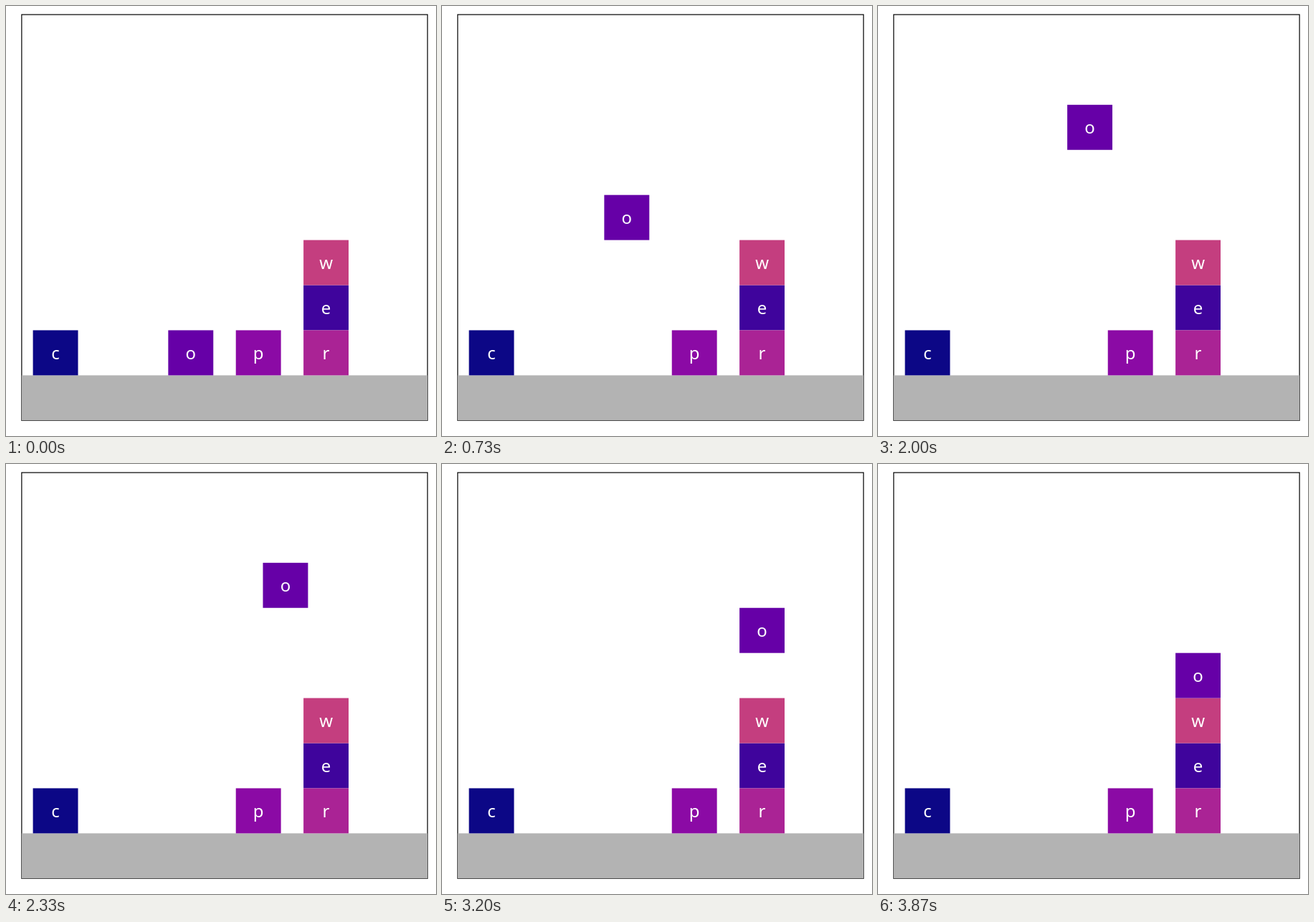
Recreate the animation shown at these times as an HTML page. Size 600x600 px, loop 4870 ms.

```html
<!DOCTYPE html>
<html lang="en">
<head>
<meta charset="utf-8">
<title>Stacking blocks</title>
<style>
  html, body { margin: 0; width: 100%; height: 100%; overflow: hidden; background: #fff; }
  svg { display: block; width: 100%; height: 100%; }
  text { font: 24px "Noto Sans", "Open Sans", sans-serif; fill: #fff; text-anchor: middle; }
</style>
</head>
<body>
<svg id="stage" viewBox="0 0 600 600"></svg>
<script>
const LOOP = 4870;
const UNIT = 62.92;
const LEFT = 21.87, TOP = 12, FLOOR = TOP + 8 * UNIT;
const stage = document.getElementById("stage");

function add(parent, tag, attrs) {
  const el = document.createElementNS("http://www.w3.org/2000/svg", tag);
  for (const key in attrs) el.setAttribute(key, attrs[key]);
  return parent.appendChild(el);
}

function place(block, column, level) {
  const x = LEFT + UNIT * (0.25 + 1.5 * column);
  const y = FLOOR - UNIT * (level + 1);
  block.setAttribute("transform", `translate(${x} ${y})`);
}

function addBlock(letter, fill, column, level) {
  const block = add(stage, "g", {});
  add(block, "rect", { width: UNIT, height: UNIT, fill });
  add(block, "text", { x: UNIT / 2, y: 40.6 }).textContent = letter;
  place(block, column, level);
  return block;
}

add(stage, "rect", {
  x: LEFT, y: TOP, width: 9 * UNIT, height: 9 * UNIT,
  fill: "#fff", stroke: "#000", "stroke-width": 1.2
});
add(stage, "rect", { x: LEFT, y: FLOOR, width: 9 * UNIT, height: UNIT, fill: "#b3b3b3" });

addBlock("c", "#0c0786", 0, 0);
addBlock("e", "#3f049c", 4, 1);
addBlock("p", "#8b0aa5", 3, 0);
addBlock("r", "#aa2395", 4, 0);
addBlock("w", "#c43e7f", 4, 2);
const mover = addBlock("o", "#6600a7", 2, 0);

// Fifteen poses a second, with switch times rounded to 10 ms
const poseTime = k => Math.round(k * 20 / 3) * 10;

function poseAt(t) {
  let k = Math.floor(t * 3 / 200) + 1;
  while (poseTime(k) > t) k--;
  return k;
}

const clamp = v => Math.min(1, Math.max(0, v));
// Lift and slide skip their first increment
const skipStart = (k, start, count) => k < start ? 0 : clamp((k - start + 2) / count);

function draw(t) {
  const k = poseAt(t);
  const lift = skipStart(k, 1, 20);
  const slide = skipStart(k, 30, 10);
  const drop = clamp((k - 38) / 20);
  place(mover, 2 + 2 * slide, 5 * lift - 2 * drop);
}

const start = performance.now();
function tick() {
  draw((performance.now() - start) % LOOP);
  requestAnimationFrame(tick);
}
draw(0);
tick();
</script>
</body>
</html>
```
